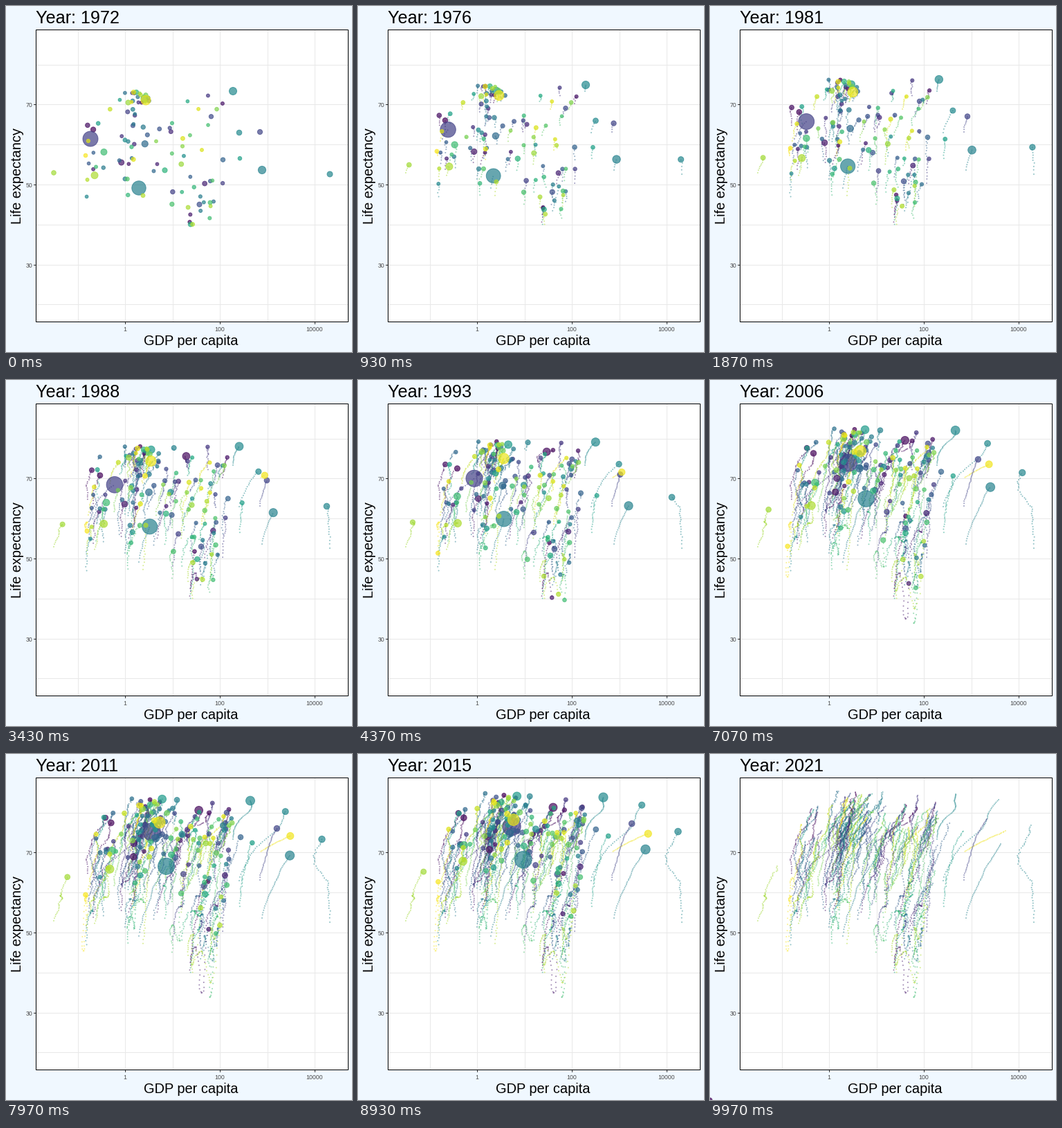
Recreate the animation shown at these times as a matplotlib script. Size 500 by 500 pixels, loop 10 s.

```python
import numpy as np
import matplotlib.pyplot as plt
from matplotlib.animation import FuncAnimation
from matplotlib.patches import Rectangle

SIZE, FRAMES, LOOP = 500, 300, 10000
PX = 0.72                      # points per pixel at 100 dpi
FIRST, SPAN = 1972, 49
years = np.arange(SPAN)        # the last year has no data, only a title
u = years / (SPAN - 1)
year_frame = np.ceil(np.arange(SPAN + 1) * (FRAMES - 1) / SPAN)
bump = np.exp(-((years - 28) / 9) ** 2)
rng = np.random.default_rng(21)

tracks = []                    # hue, radius, entry year, xs, ys


def jitter(step):
    walk = np.cumsum(rng.normal(0, step, SPAN))
    return walk - walk[0] - u * (walk[-1] - walk[0])


def add(hue, r, start, end, bow=(0, 0), entry=0, rough=.4):
    """Bubble easing from start to end, pushed aside by bow in mid-time."""
    (x0, y0), (x1, y1) = start, end
    x = x0 + (x1 - x0) * u ** 1.1 + bow[0] * bump + jitter(rough)
    y = y0 + (y1 - y0) * u ** .8 + bow[1] * bump + jitter(rough / 2)
    tracks.append((hue, r, entry, x, np.maximum(y, 54)))


def add_cloud(count, cx, sx, cy, sy, latest=0):
    """Small bubbles; the lower they start, the deeper their mid-time slump."""
    for _ in range(count):
        x, y = cx + sx * rng.uniform(-1, 1), cy + sy * rng.uniform(-1, 1)
        slump = max(y - 215, 0) * rng.uniform(0, 1.1)
        end = (x + rng.uniform(8, 40),
               64 + .5 * (y - 123) + .6 * slump + rng.normal(0, 8))
        entry = rng.integers(2, latest) if latest else 0
        r = min(2.3 + rng.exponential(.5), 5)
        bow = (rng.uniform(-9, 7), slump)
        add(rng.random(), r, (x, y), end, bow, entry, rough=1)


# the bubbles that stand out
add(.19, 11, (122, 192), (232, 98))
add(.43, 10.2, (192, 263), (245, 144), bow=(-6, 0))
add(.97, 7, (202, 136), (227, 92))
add(.44, 5.6, (370, 237), (420, 130))
add(.47, 5.5, (328, 123), (355, 58), bow=(6, 0))
add(.46, 4, (468, 243), (464, 103), bow=(-18, 0), rough=1)
add(.98, 4.3, (350, 158), (427, 111), entry=14)
add(.47, 3.8, (337, 183), (417, 66), bow=(13, 0))
add(.2, 3.6, (367, 182), (400, 94), bow=(-3, 0))
add(.86, 3.3, (69, 241), (97, 162), bow=(-5, 12), rough=.8)
add(.99, 2.8, (115, 216), (119, 178), bow=(-8, 93), rough=.8)

# the crowd: rich, left, middle, south, right, then later arrivals
add_cloud(18, 189, 18, 132, 8)
add_cloud(34, 152, 38, 202, 74)
add_cloud(16, 222, 32, 228, 64)
add_cloud(16, 276, 24, 282, 36)
add_cloud(18, 300, 48, 205, 88)
add_cloud(48, 215, 90, 195, 70, latest=25)

tracks.sort(key=lambda tr: tr[0])
hue, radius, entry, X, Y = (np.array(c) for c in zip(*tracks))
rgb = plt.cm.viridis(hue)
rgb[:, 3] = .7

# all trail dots, oldest year first
ky, kc = np.meshgrid(years, np.arange(len(tracks)), indexing="ij")
born = ky >= entry[kc]
dot_year, dot_id = ky[born], kc[born]
dots = np.column_stack([X[dot_id, dot_year], Y[dot_id, dot_year]])
dot_rgb = rgb[dot_id]
dot_rgb[:, 3] = .5

fig = plt.figure(figsize=(5, 5), dpi=100, facecolor="#F0F8FF")
ax = fig.add_axes([0, 0, 1, 1])
ax.set(xlim=(0, SIZE), ylim=(SIZE, 0))
ax.axis("off")


def label(x, y, s, px, color="black", **kw):
    return ax.text(x, y, s, family="Liberation Sans", size=px * PX,
                   color=color, va="baseline", **kw)


def line(xs, ys, color):
    ax.plot(xs, ys, color=color, lw=PX, zorder=1, solid_capstyle="butt",
            snap=False)


def panel(z, **kw):
    ax.add_patch(Rectangle((43.5, 34.5), 451, 422, lw=PX, zorder=z,
                           snap=False, **kw))


panel(0, fc="white", ec="none")
for k in range(6):
    x = round(104 + 68.4 * k) + .5
    line([x, x], [35, 456], "#E8E8E8")
    if k % 2:
        line([x, x], [457, 460], "#333333")
        label(x - .5, 469.5, str(10 ** (k - 1)), 8.8, "#4D4D4D", ha="center")
for k in range(7):
    y = round(84.7 + 57.8 * k) + .5
    line([44, 494], [y, y], "#E8E8E8")
    if k % 2:
        line([40, 43], [y, y], "#333333")
        label(38, y + 3.5, str(80 - 10 * k), 8.8, "#4D4D4D", ha="right")
panel(6, fc="none", ec="black")
label(267.5, 490.5, "GDP per capita", 20, ha="center")
label(22, 245.5, "Life expectancy", 20, ha="center", rotation=90,
      rotation_mode="anchor")
title = label(43, 25, "", 25.3)

trail = ax.scatter([], [], s=(2 * PX) ** 2, linewidths=0, zorder=3)
bubbles = ax.scatter([], [], linewidths=.7, zorder=4)


def draw(i):
    year = np.searchsorted(year_frame, i, "right") - 1
    title.set_text(f"Year: {FIRST + year}")

    n = np.searchsorted(year_frame[dot_year], i, "left")
    trail.set_offsets(dots[:n])
    trail.set_facecolors(dot_rgb[:n])

    if i > year_frame[SPAN - 1]:
        bubbles.set_offsets(np.empty((0, 2)))
    else:
        nxt = min(year + 1, SPAN - 1)
        f = (i - year_frame[year]) / (year_frame[year + 1] - year_frame[year])
        on = entry <= year
        pos = np.column_stack([P[:, year] + f * (P[:, nxt] - P[:, year])
                               for P in (X, Y)])
        r = radius * (1 + .22 * (year + f) / SPAN)
        bubbles.set_offsets(pos[on])
        bubbles.set_sizes((2 * r[on] * PX) ** 2)
        bubbles.set_facecolors(rgb[on])
        bubbles.set_edgecolors(rgb[on])
    return title, trail, bubbles


anim = FuncAnimation(fig, draw, frames=FRAMES, interval=LOOP / FRAMES,
                     init_func=lambda: draw(0), repeat=True, repeat_delay=0)
plt.show()
```
